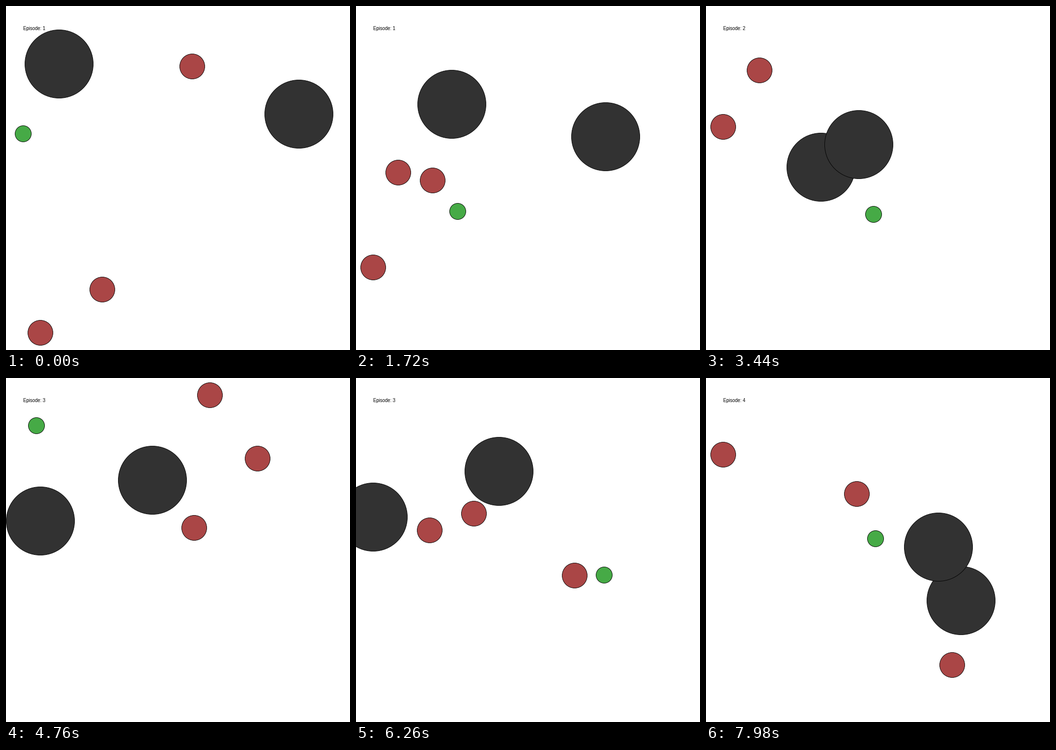
These frames come from a looping animation (700x700 px, 8 s). A matplotlib script:

```python
import numpy as np
import matplotlib.pyplot as plt
from matplotlib.animation import FuncAnimation
from matplotlib.patches import Circle

SIZE, DPI = 700, 100
HALF, REACH = SIZE / 2, 0.45 * SIZE
INTERVAL, LOOP = 20, 8000
EPISODE_MS, STEP_MS = 2320, 100
PX = 72 / DPI

RED, GREEN, DARK = "#aa4646", "#46aa46", "#323232"
STYLES = [(26, RED)] * 3 + [(17, GREEN)] + [(70, DARK)] * 2


class Episode:
    """Three chasers and a runner move between two poses; obstacles stay.

    Poses are stage positions at the steps `first` and `last`; `zoom` is how
    far the camera has pulled back by the second one. Motion ends at `stop`.
    """

    def __init__(self, first, last, stop, zoom, start, end, rocks, bends):
        self.first, self.last, self.stop = first, last, stop
        self.start = np.array(start) - HALF
        self.end = (np.array(end) - HALF) * zoom
        self.rocks = np.array(rocks) - HALF
        self.bend = np.zeros((4, 2))
        for mover, offset in bends.items():
            self.bend[mover] = offset

    def world(self, step):
        a, b, now = (travel(n) for n in
                     (self.first, self.last, min(step, self.stop)))
        u = (now - a) / (b - a)
        arc = np.sin(np.pi * np.clip(u, 0, 1))
        movers = self.start + u * (self.end - self.start) + arc * self.bend
        return np.vstack([movers, self.rocks])


def travel(n):
    """Distance after n steps from rest at full thrust with 25% drag."""
    return n - 3 * (1 - 0.75 ** n)


def project(world):
    """Zoom so that the farthest body sits at 90% of the half width."""
    return np.floor(HALF + REACH * world / np.abs(world).max() + 1e-6)


EPISODES = [
    Episode(0, 18, 18, 1.5556,
            start=[(196.5, 577.5), (70.5, 665), (379.5, 123.5), (35, 260.5)],
            end=[(86.5, 339.5), (35, 532.5), (156.5, 355.5), (207.5, 418.5)],
            rocks=[(596.5, 220.4), (108.95, 118.1)],
            bends={1: (25, -10)}),
    Episode(0, 12, 23, 2.04,
            start=[(44, 113), (36, 138), (432, 442), (470, 665)],
            end=[(109.5, 131.5), (35, 246.5), (280, 312), (341.5, 424.5)],
            rocks=[(114.4, 306.1), (271.5, 212.3)],
            bends={}),
    Episode(2, 17, 20, 0.8883,
            start=[(415.5, 35), (512.5, 164.5), (383.5, 305.5), (62.5, 97.5)],
            end=[(150.5, 310.5), (240.5, 276.5), (445.5, 402.5),
                 (505.5, 401.5)],
            rocks=[(70.2, 291.2), (298.3, 208.4)],
            bends={0: (-70, -35), 2: (0, 60), 3: (-60, 50)}),
    Episode(0, 11, 11, 1.348,
            start=[(61.5, 133.5), (156.5, 237.5), (665, 662.5),
                   (400.5, 296.5)],
            end=[(35, 156.5), (307.5, 236.5), (501.5, 584.5), (345.5, 327.5)],
            rocks=[(578.5, 489.5), (516.5, 342.5)],
            bends={0: (45, -12)}),
]


def clock(t):
    """Each episode opens with one short frame, then steps evenly."""
    episode, rest = divmod(t, EPISODE_MS)
    step = 0 if rest < INTERVAL else 1 + (rest - INTERVAL) // STEP_MS
    return episode, step


fig = plt.figure(figsize=(SIZE / DPI, SIZE / DPI), dpi=DPI, facecolor="white")
ax = fig.add_axes([0, 0, 1, 1])
ax.set_xlim(0, SIZE)
ax.set_ylim(SIZE, 0)
ax.axis("off")

label = ax.text(35, 49, "", family="Liberation Sans", fontsize=9.7 * PX,
                color="black", va="baseline", zorder=5)
bodies = [ax.add_patch(Circle((0, 0), radius - 0.5, facecolor=color,
                              edgecolor="black", linewidth=0.9 * PX))
          for radius, color in STYLES]


def update(frame):
    episode, step = clock(frame * INTERVAL)
    for body, center in zip(bodies, project(EPISODES[episode].world(step))):
        body.center = center
    label.set_text(f"Episode: {episode + 1}")
    return [*bodies, label]


anim = FuncAnimation(fig, update, frames=LOOP // INTERVAL, interval=INTERVAL,
                     init_func=lambda: update(0), repeat=True, repeat_delay=0)
plt.show()
```
